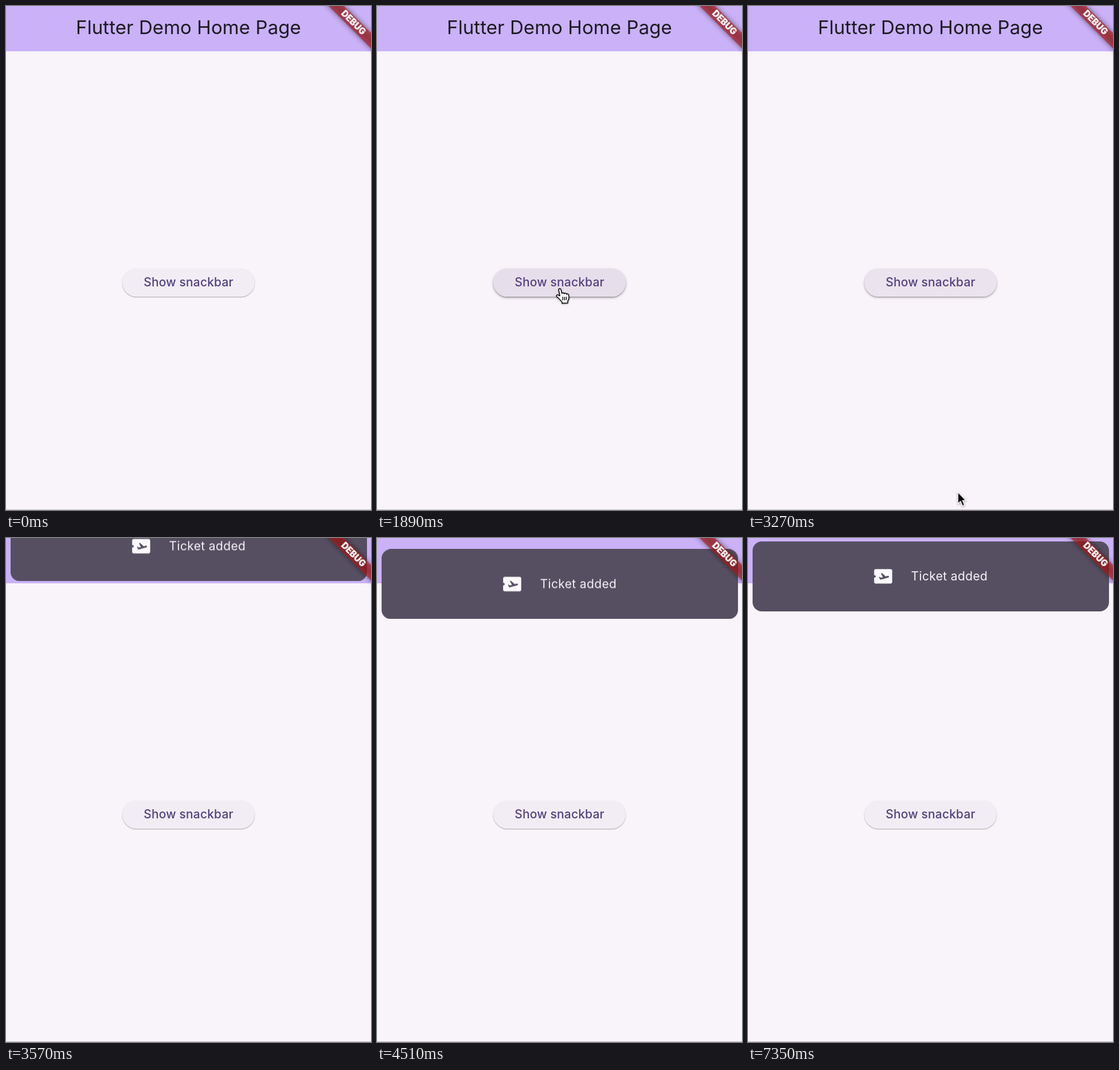
An HTML page that plays this animation: 637x879 px, repeating every 8 s.

```html
<!DOCTYPE html>
<html lang="en">
<head>
<meta charset="utf-8">
<title>Snackbar demo</title>
<style>
  html, body { margin: 0; width: 100%; height: 100%; overflow: hidden; }
  body { font-family: Inter, Roboto, sans-serif; }
  #stage { position: relative; width: 637px; height: 879px; overflow: hidden; background: #f8f4f9; }
  #stage div, #stage svg { position: absolute; box-sizing: border-box; }
  #appbar {
    left: 0; top: 0; width: 637px; height: 79px; background: #cab1f8;
    color: #1c1a21; font-size: 33px; letter-spacing: .08px; line-height: 74px;
    text-align: center; white-space: nowrap;
  }
  #edge { left: 0; bottom: 0; width: 637px; height: 1px; background: #bdb7b4; }
  #button { left: 203px; top: 458px; width: 231px; height: 48.5px; }
  #button div { inset: 0; border-radius: 25px; }
  #rest { background: #f2edf5; box-shadow: 0 1px 1.5px rgba(60, 50, 40, .42); }
  #lift { box-shadow: 0 2px 4px rgba(40, 30, 50, .32); }
  #hover { background: #e7deec; }
  #press { background: #d9cddd; }
  #button #label {
    color: #4f4380; font-size: 21px; font-weight: 500; letter-spacing: .15px;
    line-height: 48px; text-align: center; white-space: nowrap;
  }
  #snack { left: 7.5px; top: 6px; width: 622px; height: 121.5px; border-radius: 16px; background: #564f62; }
  #snack svg { left: 209.3px; top: 41.8px; }
  #snack div {
    left: 277px; top: 0; color: #f7f4f9; font-size: 21px; letter-spacing: .375px;
    line-height: 121px; white-space: nowrap;
  }
  #banner { left: 545.5px; top: 20.2px; width: 120px; height: 18.6px; transform: rotate(45deg); }
  #banner div { inset: 0; }
  #shade { background: rgba(0, 0, 0, .5); filter: blur(5px); }
  #band {
    background: rgba(183, 28, 28, .63); color: #fff; font-size: 15.3px; font-weight: 900;
    line-height: 18.6px; text-align: center;
  }
  #cursor { left: 0; top: 0; width: 40px; height: 40px; overflow: visible; filter: drop-shadow(0 1px 1.5px rgba(0, 0, 0, .4)); }
</style>
</head>
<body>
<div id="stage">
  <div id="appbar">Flutter Demo Home Page</div>
  <div id="button">
    <div id="lift"></div>
    <div id="rest"></div>
    <div id="hover"></div>
    <div id="press"></div>
    <div id="label">Show snackbar</div>
  </div>
  <div id="edge"></div>
  <div id="snack">
    <svg width="37.8" height="37.8" viewBox="0 0 24 24">
      <rect x="2" y="4" width="20" height="16" rx="1.9" fill="#fcfafd"/>
      <g fill="#564f62">
        <circle cx="2.4" cy="12" r="1.4"/>
        <path d="M17.73 13.3l-8.86 2.36-1.66-2.88.93-.25 1.26.99 2.39-.64-2.4-4.16 1.4-.38 4.01 3.74 2.44-.65c.51-.14 1.04.17 1.18.68.13.51-.17 1.04-.69 1.19z"/>
      </g>
    </svg>
    <div>Ticket added</div>
  </div>
  <div id="banner">
    <div id="shade"></div>
    <div id="band">DEBUG</div>
  </div>
  <svg id="cursor">
    <path id="arrow" d="M0 0V20.5L4.7 16.2L8.1 24.3L11.7 22.8L8.3 14.8H14.2Z"
      fill="#000" stroke="#fff" stroke-width="1.5"/>
    <g id="hand" stroke="#000" stroke-width="1.4" stroke-linejoin="round" stroke-linecap="round">
      <path transform="translate(-6.3 -2) scale(1.04)" fill="#fff" d="M5.2 3C4.8 .6 8.4 .2 9 2.6L10.6 9C11 7.4 14 7.4 14.4 9.4C15 8 17.8 8.2 18.2 10.3C19 9.2 21.6 9.6 22 11.8C22.6 15.5 22.8 19 20.4 21.6V25L11 25.4L10.6 22.6C8 20.8 6.4 17.6 2.2 14.4C.4 12.6 2.2 10.4 4.6 11.6L7.2 13.2Z"/>
      <path fill="none" d="M6 13.6l.3 5M9.2 13.6l.2 5M12.3 13.6v5"/>
    </g>
  </svg>
</div>
<script>
  const LOOP = 8000;
  const HOLD = 'steps(1, end)';
  const BACK_OUT = 'cubic-bezier(.175, .885, .32, 1.275)';

  // Each step is [time in ms, value, easing to the next step].
  function play(id, prop, steps) {
    const first = steps[0], last = steps[steps.length - 1];
    const all = [[0, first[1]], ...steps, [LOOP, last[1]]];
    const frames = all.map(([ms, value, easing = 'linear']) =>
      ({ offset: ms / LOOP, [prop]: value, easing }));
    document.getElementById(id).animate(frames, { duration: LOOP, iterations: Infinity })
      .startTime = 0;
  }

  const at = (x, y) => `translate(${x}px, ${y}px)`;

  play('cursor', 'transform', [
    [420, at(415, 890), 'ease-out'],
    [910, at(327, 529), 'ease-in-out'],
    [1450, at(318, 494)],
    [3000, at(318, 494), 'ease-in'],
    [3290, at(372, 890)]
  ]);
  play('arrow', 'opacity', [[1, 1, HOLD], [1240, 0, HOLD], [3100, 1, HOLD]]);
  play('hand', 'opacity', [[1, 0, HOLD], [1240, 1, HOLD], [3100, 0, HOLD]]);

  play('lift', 'opacity', [[1240, 0], [1440, 1], [3150, 1], [3450, 0]]);
  play('hover', 'opacity', [[1240, 0], [1340, 1], [3150, 1], [3400, 0]]);
  play('press', 'opacity', [[2560, 0, 'ease-out'], [2800, 1], [3000, 1], [3300, 0]]);

  play('snack', 'transform', [[3240, at(0, -155), BACK_OUT], [5240, at(0, 0)]]);
</script>
</body>
</html>
```
